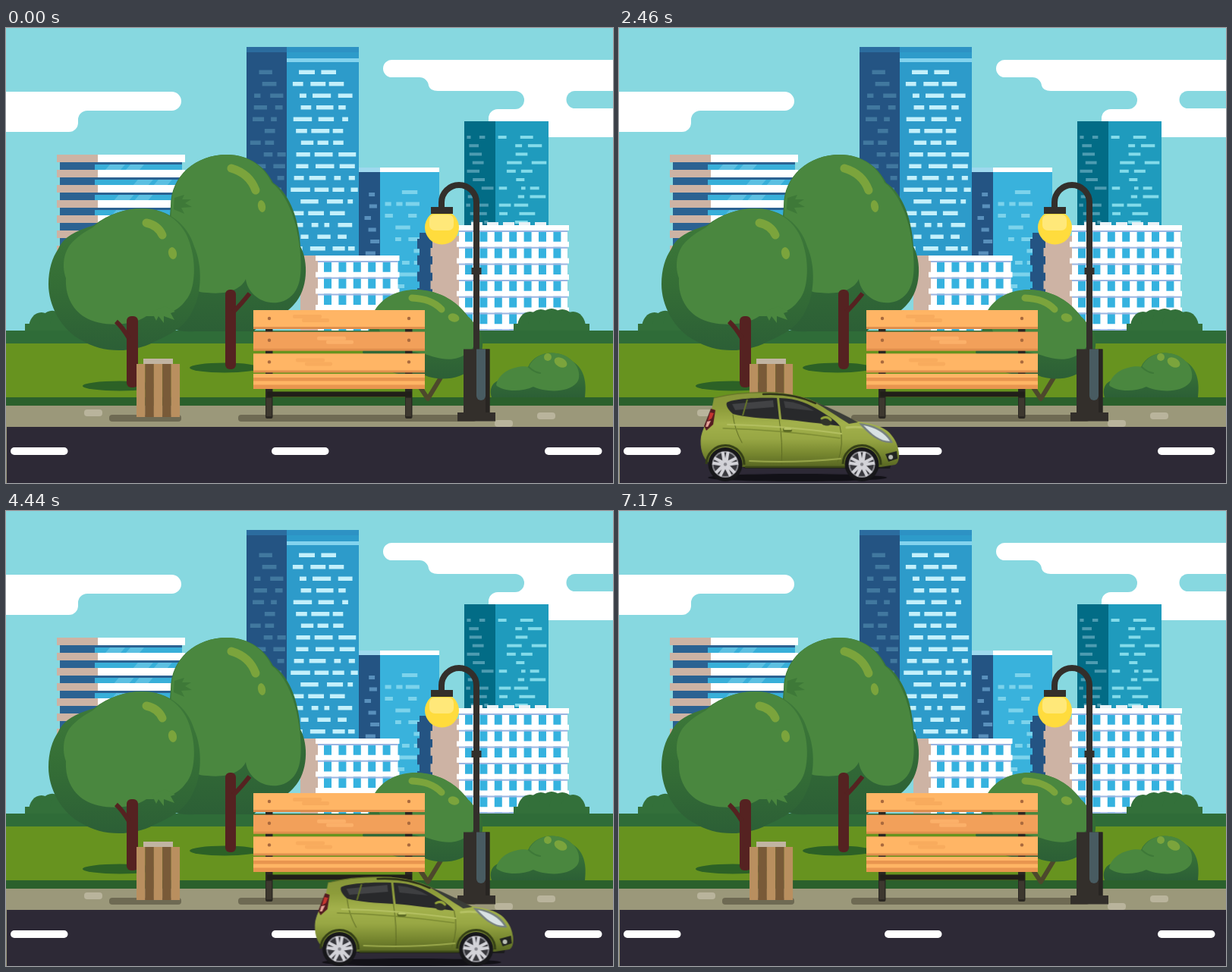
These frames come from a looping animation (800 by 600 pixels, 7200 ms). An HTML page with a canvas:

```html
<!DOCTYPE html>
<html lang="en">
<head>
<meta charset="utf-8">
<title>City park</title>
<style>
html, body { margin: 0; width: 100%; height: 100%; overflow: hidden; background: #87d8e0; }
canvas { display: block; width: 800px; height: 600px; }
</style>
</head>
<body>
<canvas id="stage" width="800" height="600"></canvas>
<script>
const LOOP = 7200, STEP = 30;
const stage = document.getElementById('stage').getContext('2d');
const layer = (w, h) => Object.assign(document.createElement('canvas'), { width: w, height: h });
let g, seed = 7;

const random = () => (seed = (seed * 16807) % 2147483647) / 2147483647;
const range = n => [...Array(n).keys()];

// Boxes are given by their edges: left, top, right, bottom
function box(color, x0, y0, x1, y1, r = 0) {
  g.fillStyle = color;
  g.beginPath();
  g.roundRect(x0, y0, x1 - x0, y1 - y0, r);
  g.fill();
}
function shape(color, d) {
  g.fillStyle = color;
  g.fill(new Path2D(d));
}
function line(color, width, d, cap = 'round') {
  g.strokeStyle = color;
  g.lineWidth = width;
  g.lineCap = cap;
  g.lineJoin = 'round';
  g.stroke(new Path2D(d));
}
function oval(color, x, y, rx, ry = rx, turn = 0) {
  g.fillStyle = color;
  g.beginPath();
  g.ellipse(x, y, rx, ry, turn, 0, Math.PI * 2);
  g.fill();
}
function fade(y0, y1, ...colors) {
  const f = g.createLinearGradient(0, y0, 0, y1);
  colors.forEach((c, i) => f.addColorStop(i / (colors.length - 1), c));
  return f;
}
// Rows of lit windows with random widths and gaps
function lights(color, x0, x1, y0, y1, pitch, h, wide, gap) {
  for (let y = y0; y < y1; y += pitch) {
    let x = x0 + random() * gap * 2;
    while (true) {
      const w = wide * (0.35 + random());
      if (x + w > x1) break;
      box(color, x, y, x + w, y + h);
      x += w + 4 + random() * gap;
    }
  }
}

function clouds() {
  shape('#fff', 'M0 84H218.5a12.5 12.5 0 0 1 0 25H107a12 12 0 0 0-12 12v4a12 12 0 0 1-12 12H0Z');
  shape('#fff', 'M800 42H508.5a11.5 11.5 0 0 0 0 23H545a12 12 0 0 1 12 11q2 7 12 7H671a12 12 0 0 1 0 24H648a12 12 0 0 0-12 12V144H800Z');
  shape('#87d8e0', 'M800 83H750a11.5 11.5 0 0 0 0 23H800Z');
}

function striped() {
  for (const i of range(7)) {
    const y = 167 + i * 20;
    box('#2b6292', 71, y + 10, 117, y + 20);
    box('#38afd9', 117, y + 10, 232, y + 20);
    const x = 130 + random() * 40;
    shape('#5cc0e2', `M${x + 7} ${y + 13}h20l-6 7h-20ZM${x + 34} ${y + 13}h18l-6 7h-18Z`);
    box('#2b6292', 117, y + 10, 232, y + 13);
    box('#fff', 121, y, 236, y + 10);
    box('#cdb3a4', 67, y, 121, y + 10);
  }
}

function towers() {
  box('#245483', 317, 25, 370, 300);
  box('#2d9bca', 370, 25, 465, 300);
  box('#2b6c9f', 317, 25, 370, 32);
  box('#2d92c4', 370, 25, 465, 32);
  box('#83d3ee', 370, 40, 465, 45);
  lights('#c3f0fb', 374, 464, 55.5, 298, 15.5, 5.5, 19, 8);
  lights('#41789f', 317, 369, 55.5, 230, 15.5, 5.5, 14, 12);

  box('#245483', 465, 184, 493, 400);
  box('#39b2dc', 493, 184, 571, 400);
  box('#9fd9ee', 465, 184, 493, 190);
  box('#fff', 493, 184, 571, 190);
  lights('#7cd3ec', 493, 568, 214, 345, 15.5, 5, 19, 24);
  lights('#5990bc', 466, 493, 217, 300, 15.5, 5, 10, 8);

  box('#026c86', 604, 123, 645, 262);
  box('#1f9bbd', 645, 123, 715, 262);
  lights('#83dbea', 646, 714, 142, 256, 11.2, 4, 16, 16);
  lights('#4d9cb1', 605, 644, 142, 256, 11.2, 4, 13, 12);
}

function offices(x0, x1, top, bottom, first, count) {
  const pitch = 21.7;
  box('#fff', x0 + 3, top, x1 - 2, bottom);
  for (const i of range(count))
    box('#35b2df', first + i * 19.4, top + 8, first + i * 19.4 + 10, bottom);
  for (let y = top; y < bottom - 5; y += pitch) {
    box('#fff', x0, y, x1, y + 7);
    box('#9bb5e2', x0 + 3, y + 7, x1 - 2, y + 9);
  }
}

function lowBlocks() {
  box('#cdb3a4', 388, 300, 411, 400);
  offices(408, 518.5, 300, 400, 419, 5);
  box('#245483', 545, 270, 563, 400);
  box('#cdb3a4', 562, 274, 597, 400);
  for (let y = 278; y < 350; y += 21.7) {
    box('#245483', 542, y, 547, y + 13);
    box('#cdb3a4', 559.5, y + 12, 564, y + 23);
  }
  for (const i of range(5)) box('#e8f1f5', 613 + i * 21, 256, 628 + i * 21, 261);
  offices(594, 742, 260, 399, 605, 7);
}

function hedge(x0, x1, top) {
  const w = x1 - x0;
  for (const i of range(5)) {
    const u = (i + 0.5) / 5, lift = Math.sin(u * Math.PI) ** 0.6;
    oval('#33703a', x0 + w * (0.16 + 0.68 * u), 398 + (top + 20 - 398) * lift, w * 0.16, 20);
  }
  box('#33703a', x0 + 2, 390, x1 - 2, 402);
}

function ground() {
  hedge(23, 127, 372);
  hedge(667, 771, 370);
  box('#2f6c38', 0, 399, 800, 417);
  box('#67931f', 0, 416, 800, 488);
  box('#2b602c', 0, 487, 800, 499);
  box('#9b987a', 0, 498, 800, 527);
  for (const [x, y] of [[103, 503], [700, 507], [644, 517]]) box('#b9b49c', x, y, x + 24, y + 9, 4);
  box('#6e6a53', 136, 510, 231, 519, 4);
  box('#6e6a53', 306, 510, 620, 519, 4);
  box('#2d2936', 0, 526, 800, 600);
  box('#9b987a', 0, 526, 1, 600);
  for (const x of [6, 350, 710]) box('#fff', x, 553, x + 75.5, 563, 5);
}

const LEAF = '#4a873f', EDGE = '#3e7938', GLOW = '#7ba43c', BARK = '#552221';
const shade = (y0, y1) => fade(y0, y1, '#3f7b3a', '#356f36', '#2c5f36');

function backTree() {
  oval('#2c6126', 288, 448, 46, 6.5);
  shape(shade(167, 402), 'M291 167C322 167 342 184 352 204C376 220 386 255 388 288C399 308 398 345 380 364C365 382 340 388 326 400H250C225 402 212 395 205 385L217 235C217 195 250 167 291 167Z');
  shape(LEAF, 'M291 167C322 167 342 186 350 204C374 222 384 262 387 288C391 325 389 350 366 360C340 369 318 350 316 331C310 345 290 352 265 349C225 350 215 280 218 233C219 195 250 167 291 167Z');
  shape(EDGE, 'M222 224l13-4-3 6 12 0-8 5 9 5-14 1 4 8-14-6Z');
  box(BARK, 289, 345, 303, 450, 6);
  line(BARK, 6, 'M300 374Q310 364 321 350', 'butt');
  line(GLOW, 11, 'M297 185Q321 192 329 214');
  oval(GLOW, 337, 235, 5, 8, -.2);
}

function frontTree() {
  oval('#2c6126', 150, 472, 49, 6.5);
  shape(shade(238, 425), 'M180 238C215 238 240 260 248 288C260 315 257 352 247 370C237 395 215 405 195 414C165 430 125 428 100 412C72 398 56 365 56 338C56 318 61 303 69 291C78 272 98 266 116 260C135 245 158 238 180 238Z');
  shape(LEAF, 'M180 238C213 238 238 260 244 290C250 310 250 345 237 359C225 376 205 381 185 380C165 394 125 394 105 382C85 370 78 350 79 330C72 310 78 290 90 280C102 268 112 266 118 260C135 245 158 238 180 238Z');
  shape(LEAF, 'M192 374l6 12 3-6 7 9 0-9 14 5-5-9 6-2-13-7Z');
  box(BARK, 159, 380, 174, 474, 6);
  line(BARK, 6, 'M145 387Q153 394 162 409', 'butt');
  line(GLOW, 11, 'M185 257Q200 260 206 273');
  oval(GLOW, 219.5, 297, 5.5, 8, -.2);
}

function shrubs() {
  line('#4d482c', 6, 'M546 474L556 489L573 461', 'butt');
  shape(shade(345, 463), 'M470 428C478 388 500 346 540 345C575 346 600 365 612 385C634 400 632 430 616 446C600 466 565 466 548 456C520 462 485 450 470 428Z');
  shape(LEAF, 'M484 376C495 354 518 345 540 345C575 346 595 362 608 380C624 390 624 420 608 428C590 444 565 434 552 430L500 420Z');
  line(GLOW, 9, 'M535 356Q561 357 574 371');
  oval(GLOW, 590, 382, 7.5, 5.5, .3);
  shape(shade(428, 487), 'M640 487C636 474 643 465 653 464C668 446 680 452 688 447C698 424 732 424 746 439C764 450 765 470 763 487Z');
  shape(LEAF, 'M646 471C650 450 678 444 689 447C699 424 732 424 745 438C756 446 758 462 752 468C740 482 710 480 695 473C680 480 655 480 646 471Z');
  line(EDGE, 2, 'M689 447Q696 454 704 455');
  oval(GLOW, 714, 434, 5);
  oval(GLOW, 731, 441, 9, 6, .5);
}

function bin() {
  for (const i of range(5))
    box(i % 2 ? '#795a38' : '#b98f5f', 172 + i * 11.4, 443, 183.5 + i * 11.4, 513);
  box('#c1b4a2', 181, 436, 220, 443);
}

function bench() {
  for (const x of [342, 526]) {
    box('#2b2822', x, 390, x + 9.5, 515, 2);
    box('#3d382f', x + 1, 488, x + 8, 512);
  }
  box('#211f19', 344, 479.5, 535, 486.5);
  for (const i of range(3)) {
    const y = 372 + i * 28.7, mid = i === 1;
    box('#e08f4d', 326, y, 552, y + 25);
    box(mid ? '#f2a05a' : '#ffb565', 326, y, 552, y + 22);
    const x = 378 + i * 32 % 60, grain = mid ? '#fbb069' : '#f8ab5d';
    box(grain, x, y + 6, x + 38, y + 11, 2);
    box(grain, x + 12, y + 11, x + 48, y + 16, 2);
    for (const sx of [347, 531]) oval('#a9693d', sx, y + 11, 2.2);
  }
  for (const y of [456, 465.5]) {
    box('#ffb565', 326, y, 552, y + 6);
    box('#e8954f', 326, y + 5, 552, y + 10.5);
  }
}

function lamp() {
  const iron = '#332f2b';
  line(iron, 8, 'M574 240V230A23 23 0 0 1 620 230V426', 'butt');
  box(iron, 613.5, 316, 626.5, 325);
  oval('#ffdc3d', 574.5, 263, 22.5);
  box('#ffe879', 558, 246, 590, 267, 7);
  box(iron, 560, 236, 589, 245);
  box(iron, 603, 423.5, 637.5, 508);
  box('#485b61', 620, 423.5, 632, 491, [0, 0, 6, 6]);
  box('#282522', 632, 423.5, 637.5, 508);
  box(iron, 595, 507, 645, 518.5);
}

function wheel(x, y) {
  oval('#17171a', x, y, 22.5);
  oval('#8c8c92', x, y, 17.5);
  oval('#37373c', x, y, 15.5);
  g.save();
  g.translate(x, y);
  for (const i of range(5)) {
    shape('#d3d3d8', 'M-3 0L-5.5-16.5H-1.5L0-8L1.5-16.5H5.5L3 0Z');
    g.rotate(Math.PI * 2 / 5);
  }
  g.restore();
  oval('#d3d3d8', x, y, 4.5);
  oval('#85858b', x, y, 2.2);
}

function car() {
  oval('#121117', 128, 592, 118, 5);
  shape('#1b1b1d', 'M10 560H255L250 580H60Z');
  // Body
  shape(fade(480, 582, '#87963a', '#8d9c3a', '#a3b14c', '#98a744', '#76862f', '#515f20'),
    'M18 487C45 480 78 479 102 480C126 481 147 489 164 498C180 505 195 514 208 518C226 521 238 524 246 530C255 537 260 548 261 555C263 562 262 573 257 575L238 578H56L12 573C3 567-1 552 1 538C4 525 10 517 14 507Z');
  line('#65742a', 1.2, 'M18 487C45 480 78 479 102 480');
  line('#2e3219', 2.5, 'M83 482Q122 480 152 494');
  // Glass
  shape('#28292b', 'M35 493C44 488 75 486 101 487L104 515C82 514 58 512 43 508C38 504 33 497 35 493Z');
  shape('#28292b', 'M104 487C128 487 145 496 158 504C170 511 181 519 184 524C160 521 130 517 107 515Z');
  shape('#424345', 'M42 495L96 490L97 499L46 503Z');
  shape('#3e3f41', 'M110 491Q133 493 150 504L112 500Z');
  shape('#3a3d38', 'M150 492C175 501 195 512 208 519L196 521C180 511 167 502 150 492Z');
  line('#65752a', 2, 'M62 489L56 510', 'butt');
  oval('#31342a', 166, 517, 8, 6.5, .2);
  line('#93a43a', 3, 'M160 514Q167 510 172 516');
  // Panels and creases
  line('#5d6b24', 1, 'M104 515Q109 545 107 576M184 524Q190 548 181 572M43 509Q45 528 55 546');
  line('#b5c163', 2, 'M36 522Q105 523 186 534');
  line('#7b8a33', 1.3, 'M30 527Q104 529 184 540');
  line('#9aa84c', 2, 'M65 570Q125 573 185 567');
  line('#3d4a18', 2.5, 'M60 578H190');
  line('#b5c163', 3, 'M193 526Q220 523 238 534');
  box('#5d6b24', 109, 526, 121, 532, 3);
  box('#b9c668', 110, 526, 121, 529, 2);
  // Lamps
  shape('#541c20', 'M14 501L20 503L17 522L8 530L5 524Z');
  shape('#c53630', 'M13 506L18 507L15 514L10 517Z');
  shape('#e7a49a', 'M9 518L14 517L10 525L7 525Z');
  shape('#77817f', 'M209 520C228 522 246 529 254 546C238 548 222 536 209 520Z');
  shape('#d9e2e4', 'M215 523C231 526 243 533 250 544C237 544 226 535 215 523Z');
  shape('#222521', 'M244 561L259 557L260 567L248 571Z');
  oval('#b9bdb4', 251, 565, 3);
  for (const x of [33, 213]) {
    line('#354016', 3, `M${x - 25} 574A25 25 0 0 1 ${x + 25} 575`, 'butt');
    wheel(x, 574.5);
  }
}

const scene = layer(800, 600), vehicle = layer(280, 600);
g = scene.getContext('2d');
box('#87d8e0', 0, 0, 800, 600);
[clouds, striped, towers, lowBlocks, ground, backTree, frontTree,
  shrubs, bin, bench, lamp].forEach(draw => draw());
g = vehicle.getContext('2d');
g.translate(8, 0);
car();

// The car crosses at a steady speed on a very slight slope
function frame(now) {
  const t = Math.floor((now % LOOP) / STEP) * STEP;
  stage.drawImage(scene, 0, 0);
  stage.drawImage(vehicle, -273 + t * 0.15125, -2 + t * 0.00115);
  requestAnimationFrame(frame);
}
frame(0);
</script>
</body>
</html>
```
